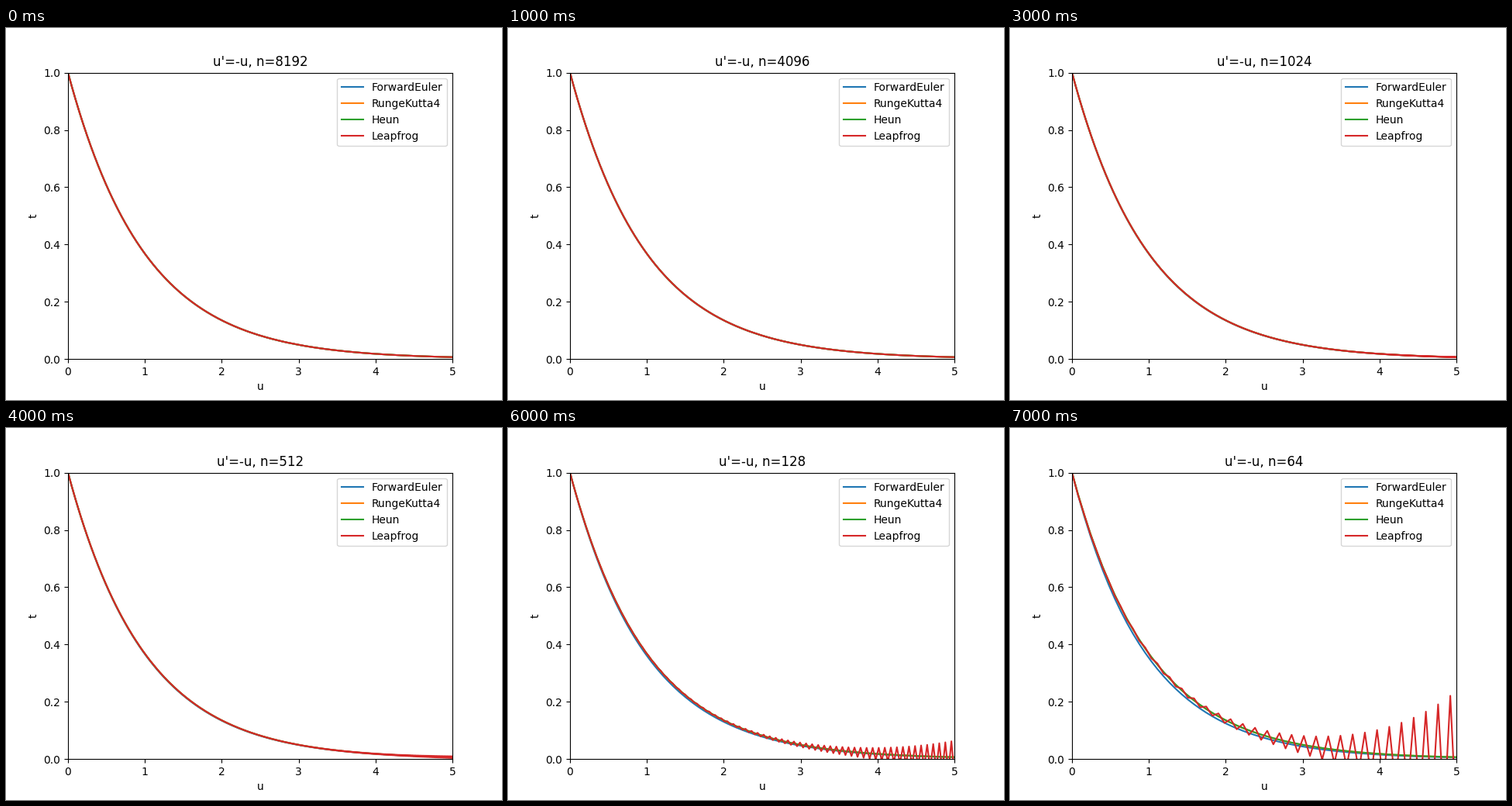
Recreate the animation shown at these times as a matplotlib script. Size 640 by 480 pixels, loop 8000 ms.

```python
import numpy as np
import matplotlib.pyplot as plt
from matplotlib.animation import FuncAnimation

T_END = 5.0
SIZES = [2 ** k for k in range(13, 5, -1)]


def one_step(growth, n):
    """A one-step method multiplies u by a constant factor each step."""
    return growth ** np.arange(n)


def forward_euler(h, n):
    return one_step(1 - h, n)


def heun(h, n):
    return one_step(1 - h + h**2 / 2, n)


def runge_kutta4(h, n):
    return one_step(1 - h + h**2 / 2 - h**3 / 6 + h**4 / 24, n)


def leapfrog(h, n):
    u = np.ones(n)
    u[1] = 1 - h
    for k in range(2, n):
        u[k] = u[k - 2] - 2 * h * u[k - 1]
    return u


METHODS = {
    "ForwardEuler": forward_euler,
    "RungeKutta4": runge_kutta4,
    "Heun": heun,
    "Leapfrog": leapfrog,
}

fig, ax = plt.subplots(figsize=(6.4, 4.8), dpi=100)
lines = [ax.plot([], [], label=name)[0] for name in METHODS]
ax.set_xlim(0, T_END)
ax.set_ylim(0, 1)
ax.set_xlabel("u")
ax.set_ylabel("t")
ax.legend(loc="upper right")
title = ax.set_title("")


def draw(i):
    n = SIZES[i]
    t, h = np.linspace(0, T_END, n, retstep=True)
    for line, method in zip(lines, METHODS.values()):
        line.set_data(t, method(h, n))
    title.set_text(f"u'=-u, n={n}")
    return [*lines, title]


anim = FuncAnimation(fig, draw, frames=len(SIZES), interval=1000,
                     repeat=True, repeat_delay=0, blit=False)
plt.show()
```
